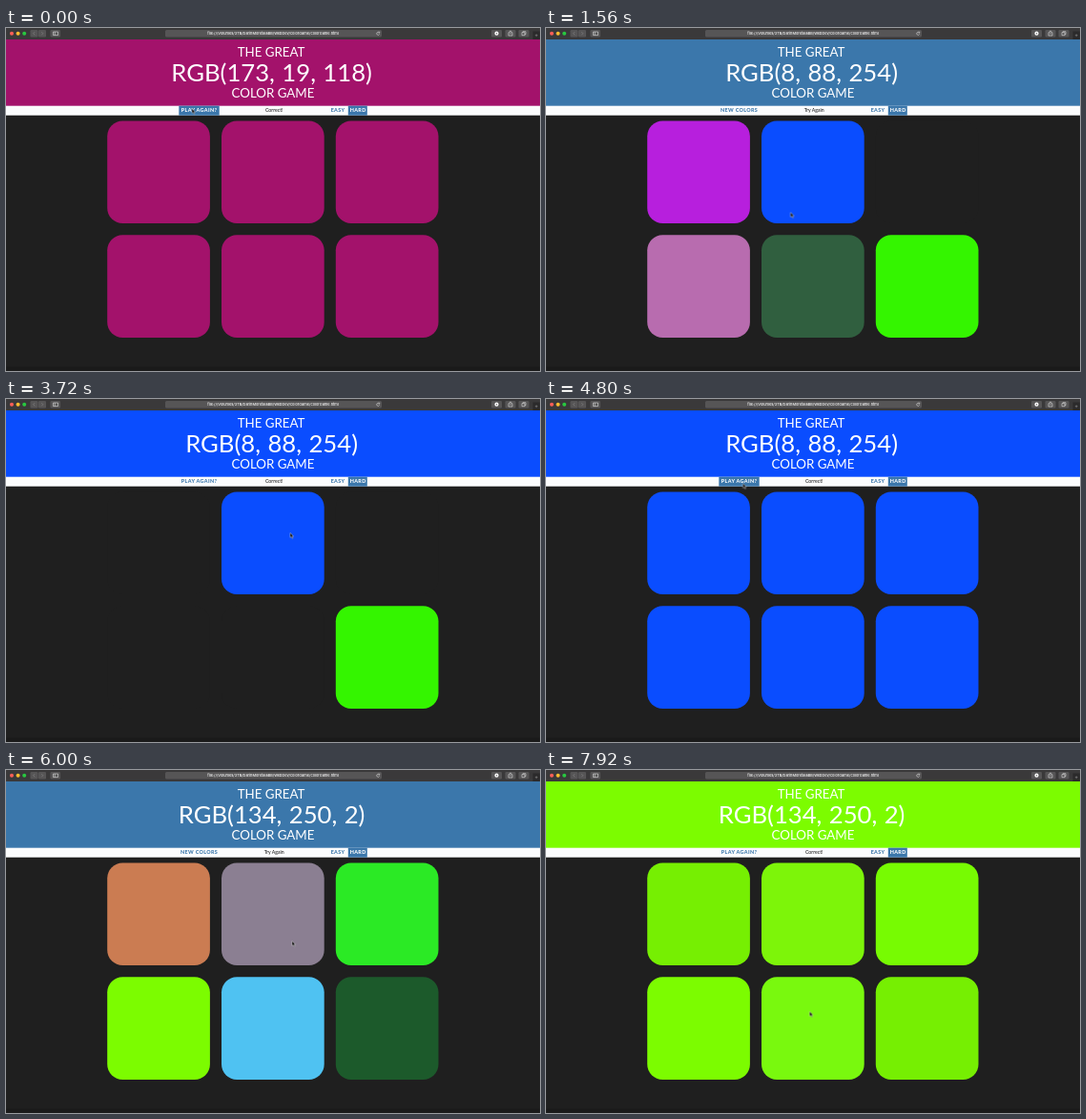
These frames come from a looping animation (560 by 360 pixels, 8 s). An HTML page:

```html
<!DOCTYPE html>
<html lang="en">
<head>
<meta charset="utf-8">
<title>Color Game</title>
<style>
  html, body { margin: 0; width: 100%; height: 100%; overflow: hidden; background: #1f1f1f; }
  svg { display: block; width: 100vw; height: 100vh; }
  text { font-family: Lato, "Open Sans", sans-serif; text-anchor: middle; }
  .title { fill: #fff; font-size: 13.3px; }
  #goal { font-size: 25.7px; word-spacing: .8px; }
  .btn { font-size: 5.4px; font-weight: 800; letter-spacing: .36px; fill: #3b77ab; }
  .btn.on { fill: #fff; }
  #message { font-size: 5.2px; fill: #111; }
  .url { font: 500 3.87px Inter, sans-serif; fill: #fff; }
  .icon { fill: none; stroke: #ddd; stroke-width: .6; }
</style>
</head>
<body>
<svg viewBox="0 0 560 360" preserveAspectRatio="none">
  <rect width="560" height="360" fill="#1f1f1f"/>
  <rect y="355.5" width="560" height="4.5" fill="#1a1a1a"/>

  <g id="browser">
    <rect width="560" height="12" fill="#3a393a"/>
    <circle cx="6" cy="5.7" r="2" fill="#ff5f57"/>
    <circle cx="12.6" cy="5.7" r="2" fill="#febc2e"/>
    <circle cx="19.2" cy="5.7" r="2" fill="#28c840"/>
    <g fill="#565556">
      <rect x="25.5" y="2" width="8" height="7.5" rx="1.3"/>
      <rect x="34" y="2" width="8" height="7.5" rx="1.3"/>
      <rect x="46.5" y="2" width="10.5" height="7.5" rx="1.3"/>
      <rect x="167" y="2" width="227" height="7.5" rx="1.5"/>
      <rect x="509" y="2" width="11" height="7.5" rx="1.3"/>
      <rect x="523.5" y="2" width="11" height="7.5" rx="1.3"/>
      <rect x="537.5" y="2" width="11" height="7.5" rx="1.3"/>
    </g>
    <rect x="552.5" y="3.5" width="7.5" height="8.5" fill="#2b2a2b"/>
    <path class="icon" style="stroke:#888" d="M30.2 4.1l-1.5 1.6 1.5 1.6M37.3 4.1l1.5 1.6-1.5 1.6M554.8 7.7h2.8M556.2 6.3v2.8"/>
    <path class="icon" d="M49.5 4h5v3.6h-5zM51.2 4v3.6M528 4.7h-1v3.3h4V4.7h-1M529 6.5V3M528 3.8l1-1 1 1M541 4.7h3v3h-3zM542 4.7V3.7h3v3h-1"/>
    <path class="icon" d="M391.5 5a1.5 1.5 0 1 0 .1 1.4M391.7 3.7V5h-1.3"/>
    <circle cx="514.5" cy="5.7" r="2.1" fill="#fff"/>
    <path d="M513.6 5.2h1.8l-.9 1.5z" fill="#565556"/>
    <text class="url" x="280" y="7.2">file:///Volumes/3TB/DarinMoretalaBB/WebDev/colorGame/colorGame.html</text>
  </g>

  <rect id="header" y="12" width="560" height="70"/>
  <text class="title" x="278" y="29.6">THE GREAT</text>
  <text class="title" id="goal" x="278.6" y="55.8"></text>
  <text class="title" x="280" y="72.6">COLOR GAME</text>

  <rect y="81.7" width="560" height="10" fill="#fbfcfd"/>
  <rect id="hover" x="181.3" y="81.7" width="42.4" height="10" fill="#3b77ab"/>
  <text class="btn" id="reset" x="202.6" y="88.3"></text>
  <text id="message" x="281.2" y="88.2"></text>
  <text class="btn" x="348" y="88.3">EASY</text>
  <rect x="358.8" y="81.7" width="20" height="10" fill="#3b77ab"/>
  <text class="btn on" x="369.2" y="88.3">HARD</text>

  <g id="squares"></g>
  <path id="cursor" d="M0 0V5l1.2-1 .9 1.9.9-.4-.9-1.8h1.6z" fill="#111" stroke="#fff" stroke-width=".35"/>
</svg>
<script>
const LOOP = 8000, STEP = 120, FADE = 600;
const BG = '#1f1f1f', STEEL = '#3b77ab', MAGENTA = '#a3126b';
const SIZE = 107.7, PITCH = 119.8;
const $ = id => document.getElementById(id);

// Each pick is [time, square]; the last pick of a round wins it.
const rounds = [
  { at: -LOOP, goal: 'RGB(173, 19, 118)', colors: Array(6).fill(MAGENTA), picks: [[-FADE, 0]] },
  { at: 240, goal: 'RGB(8, 88, 254)',
    colors: ['#b71fdd', '#0a4dff', '#1fa8a0', '#b86caf', '#305f3f', '#34f500'],
    picks: [[900, 2], [1830, 4], [2340, 0], [2830, 3], [3720, 1]] },
  { at: 4980, goal: 'RGB(134, 250, 2)',
    colors: ['#cb7c52', '#8b7f92', '#2bea25', '#7cfc00', '#4fc2f2', '#198a35'],
    picks: [[5840, 5], [6720, 0], [7500, 3]] },
];
for (const round of rounds) {
  [round.won, round.answer] = round.picks.at(-1);
}

const corner = i => [106.2 + PITCH * (i % 3), 97.4 + PITCH * Math.floor(i / 3)];
const squares = Array.from({ length: 6 }, (_, i) => {
  const square = document.createElementNS('http://www.w3.org/2000/svg', 'rect');
  const [x, y] = corner(i);
  const box = { x, y, width: SIZE, height: SIZE, rx: SIZE * .15, fill: MAGENTA };
  for (const key in box) square.setAttribute(key, box[key]);
  $('squares').append(square);
  return square;
});

// Every change eases from whatever the earlier ones left behind.
const animations = [];
function change(element, style, delay, duration, easing) {
  const animation = element.animate(style, { delay, duration, easing, fill: 'forwards' });
  animation.pause();
  animations.push(animation);
}
const fade = (i, fill, at) => change(squares[i], { fill }, at, FADE, 'ease');

for (const { at, colors, picks, won, answer } of rounds.slice(1)) {
  squares.forEach((_, i) => fade(i, colors[i], at));
  for (const [time, i] of picks.slice(0, -1)) fade(i, BG, time);
  squares.forEach((_, i) => fade(i, colors[answer], won));
}

// The pointer visits every click and a few places in between.
const clicks = rounds.slice(1).flatMap(({ at, picks }) => [
  [at, 205, 86],
  ...picks.map(([time, i]) => {
    const [x, y] = corner(i);
    return [time, x + 72, y + 43];
  }),
]);
const stops = [[0, 195, 84.5], [1560, 256.5, 193.5], [3000, 244, 248], [4800, 206.5, 88.5],
               [6000, 300, 179.5], [7200, 178, 260], [7920, 276.5, 253.5]];
const route = [...clicks, ...stops].sort((a, b) => a[0] - b[0]);
const place = ([, x, y]) => `translate(${x}px, ${y}px)`;
$('cursor').style.transform = place(route[0]);
route.slice(1).forEach((stop, i) => {
  const since = route[i][0];
  change($('cursor'), { transform: place(stop) }, since, stop[0] - since, 'ease-in-out');
});

function render(now) {
  const time = Math.floor((now % LOOP) / STEP) * STEP;
  for (const animation of animations) animation.currentTime = time;

  const round = rounds.findLast(r => r.at <= time);
  const won = time >= round.won;
  const tried = time >= round.picks[0][0];
  const hovered = rounds.some(r => Math.abs(time - r.at) < 250);
  $('header').setAttribute('fill', won ? round.colors[round.answer] : STEEL);
  $('goal').textContent = round.goal;
  $('reset').textContent = won ? 'PLAY AGAIN?' : 'NEW COLORS';
  $('reset').classList.toggle('on', hovered);
  $('hover').style.opacity = hovered ? 1 : 0;
  $('message').textContent = won ? 'Correct!' : tried ? 'Try Again' : '';
}

const start = performance.now();
function tick() {
  render(performance.now() - start);
  requestAnimationFrame(tick);
}
tick();
</script>
</body>
</html>
```
